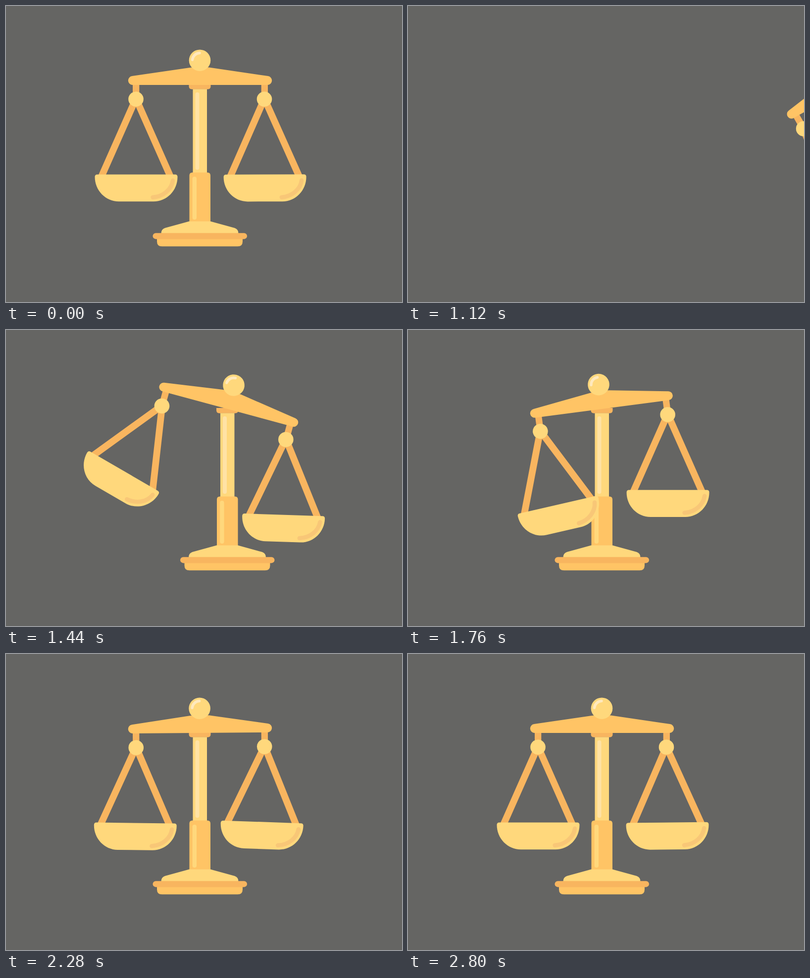
An HTML page for the animation above (2.84 s loop, 800 by 600 pixels).

```html
<!DOCTYPE html>
<html lang="en">
<head>
<meta charset="utf-8">
<title>Scales</title>
<style>
html, body { margin: 0; width: 100%; height: 100%; overflow: hidden; background: #656563; }
svg { display: block; width: 100vw; height: 100vh; }
.light { fill: #ffd87c; }
.mid { fill: #ffc465; }
.dark { fill: #f8b55f; }
.line { fill: none; stroke-linecap: round; }
</style>
</head>
<body>
<svg viewBox="0 0 800 600">
  <defs>
    <!-- Pan hangs from (0,0) -->
    <g id="pan">
      <path d="M-70.6 159L0-1L70.6 159" fill="none" stroke="#f8b55f" stroke-width="13.7"/>
      <circle class="light" r="15.3"/>
      <path class="light" d="M-78 152.7H79Q84 152.7 84 157.7C84 185 62.500 207.500 35.500 207.500H-34.500C-61.500 207.500-83 185-83 157.700Q-83 152.700-78 152.700Z"/>
      <path class="line" stroke="#f8c777" stroke-width="8.5" d="M74.500 165C72 183 55.500 197.500 34 199"/>
    </g>
  </defs>
  <g id="scale">
    <path class="dark" d="M369.500 158H413.500V163Q413.500 168.700 407.500 168.700H375.500Q369.500 168.700 369.500 163Z"/>
    <rect class="light" x="377.500" y="168.500" width="28.500" height="172"/>
    <rect x="382.500" y="175" width="8" height="157" rx="4" fill="#ffe2a5"/>
    <path class="mid" d="M370.500 438V343.500Q370.500 337.500 376.500 337.500H407Q413 337.500 413 343.500V438Z"/>
    <rect class="light" x="376.700" y="346" width="8.300" height="87" rx="4.100"/>
    <path class="light" d="M313.500 461Q313.500 452.500 321 450L370 436.500H413L462 450Q469.500 452.500 469.500 461Z"/>
    <path class="mid" d="M305 471H478V477.500Q478 487.300 468 487.300H315Q305 487.300 305 477.500Z"/>
    <rect class="dark" x="296.500" y="460.200" width="190.500" height="12.200" rx="6.100"/>
    <g id="beam">
      <path class="dark" d="M256 155H269.300V178H256ZM515.700 155H529V178H515.700Z"/>
      <path class="mid" d="M256 160H528A9 9 0 0 0 529.500 142.100L412 124.700Q391.500 122 371 125L254.500 142.100A9 9 0 0 0 256 160Z"/>
      <circle class="light" cx="391.500" cy="110.200" r="21.800"/>
      <path class="line" stroke="#ffe9bd" stroke-width="5.500" d="M376.500 109A15 15 0 0 1 391 95.300"/>
    </g>
    <use id="left" href="#pan"/>
    <use id="right" href="#pan"/>
  </g>
</svg>
<script>
const LOOP = 2840, STEP = 40, HIDE = 440, SHOW = 1120;
const PIVOT = { x: 391.5, y: 160 };
const get = id => document.getElementById(id);
const scale = get("scale"), beam = get("beam"), left = get("left"), right = get("right");

// Swing extremes: [time, degrees]
const beamKeys = [[1120, -29.6], [1440, 15.2], [1760, -7.5], [2060, 3.9], [2380, -1.7], [2700, 0]];
const leftKeys = [[1120, -15], [1440, 15], [1820, -6.8], [2140, 2.6], [2520, -2.2], [2800, 0]];
const rightKeys = [[1120, 15], [1420, -13.6], [1700, 9.3], [1980, -7], [2260, 2.5], [2620, -2], [2900, 0]];

function swing(keys, t) {
  const i = keys.findIndex(k => k[0] > t);
  if (i < 0) return 0;
  if (i === 0) return keys[0][1];
  const [t0, a] = keys[i - 1], [t1, b] = keys[i];
  return a + (b - a) * (1 - Math.cos(Math.PI * (t - t0) / (t1 - t0))) / 2;
}

function hang(pan, dx, tilt, own) {
  const r = tilt * Math.PI / 180, c = Math.cos(r), s = Math.sin(r), dy = 28.8;
  const x = PIVOT.x + dx * c - dy * s, y = PIVOT.y + dx * s + dy * c;
  pan.setAttribute("transform", `translate(${x} ${y}) rotate(${tilt + own})`);
}

function draw(now) {
  let t = Math.floor(now % LOOP / STEP) * STEP;
  scale.style.display = t >= HIDE && t < SHOW ? "none" : "";
  if (t < HIDE) t += LOOP;
  const slide = 55.5 * Math.pow(Math.max(0, 1734 - t) / 294, 3);
  const tilt = swing(beamKeys, t);
  scale.setAttribute("transform", `translate(${slide} 0)`);
  beam.setAttribute("transform", `rotate(${tilt} ${PIVOT.x} ${PIVOT.y})`);
  hang(left, -129, tilt, swing(leftKeys, t));
  hang(right, 130.5, tilt, swing(rightKeys, t));
}

let start;
function tick(now) {
  start ??= now;
  draw(now - start);
  requestAnimationFrame(tick);
}
draw(0);
requestAnimationFrame(tick);
</script>
</body>
</html>
```
